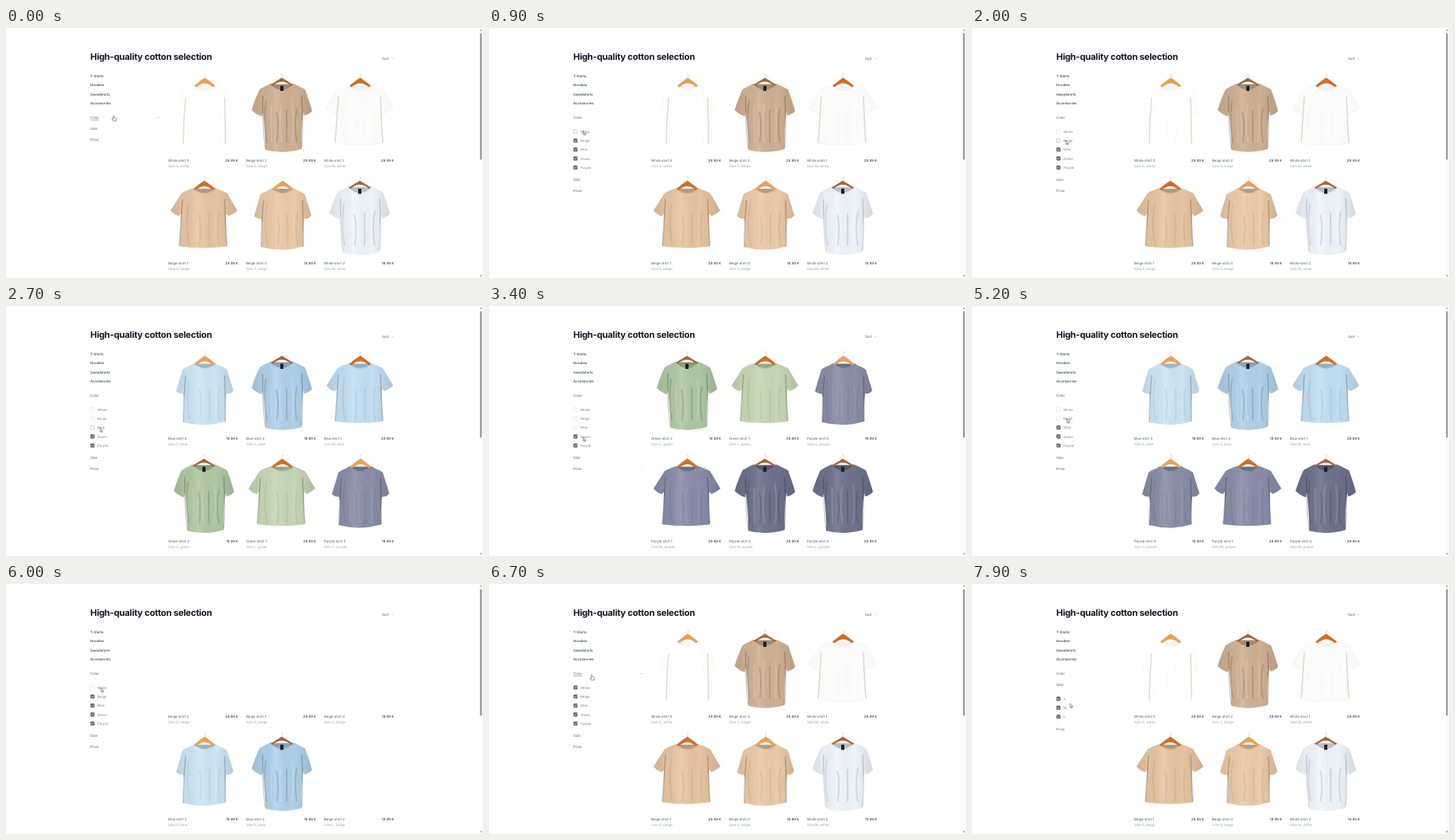
An HTML page for the animation above (8000 ms loop, 600 by 314 pixels).

```html
<!DOCTYPE html>
<html lang="en">
<head>
<meta charset="utf-8">
<title>Cotton selection</title>
<style>
  html, body { margin: 0; width: 100%; height: 100%; overflow: hidden; background: #fff; }
  svg { display: block; width: 100%; height: 100%; }
  text { font: 4.375px Inter, sans-serif; fill: #4b5563; text-rendering: geometricPrecision; }
  .title { font-size: 11.25px; font-weight: 700; letter-spacing: -.021em; fill: #111827; }
  .strong { font-weight: 500; fill: #343b48; }
  .label { fill: #7b828e; }
  .muted { fill: #9aa0aa; }
  .hover { text-decoration: underline; text-decoration-thickness: .25px; }
</style>
</head>
<body>
<svg viewBox="0 0 600 314" preserveAspectRatio="none">
  <defs>
    <linearGradient id="shade">
      <stop offset="0" stop-color="#000" stop-opacity=".1"/>
      <stop offset=".2" stop-color="#000" stop-opacity=".03"/>
      <stop offset=".4" stop-color="#fff" stop-opacity=".1"/>
      <stop offset=".7" stop-color="#000" stop-opacity=".01"/>
      <stop offset="1" stop-color="#000" stop-opacity=".12"/>
    </linearGradient>
    <filter id="soft"><feGaussianBlur stdDeviation=".7"/></filter>
  </defs>
  <text class="title" x="106" y="40">High-quality cotton selection</text>
  <text x="473" y="40">Sort</text>
  <path d="M485 38l1 .9 1-.9" fill="none" stroke="#9ca3af" stroke-width=".5"/>
  <g id="categories"></g>
  <g id="filters"></g>
  <g id="grid"></g>
  <rect x="595.3" width="4.7" height="314" fill="#fbfbfb"/>
  <path d="M596.3 3.6l1.3-2 1.3 2zM596.3 310.4l1.3 2 1.3-2z" fill="#858585"/>
  <rect id="thumb" x="596.4" y="6.5" width="2" rx="1" fill="#8b8b8b"/>
  <g id="cursor" stroke-linejoin="round">
    <path id="arrow" d="M0 0v5.1l1.2-1.1.8 1.9.8-.4-.8-1.8h1.6z" fill="#fff" stroke="#222" stroke-width=".45"/>
    <path id="hand" d="M-.6.4Q0-.3.6.4V2.6l2.2.5q.7.2.7.9L3 6.8H-.6L-2.2 4.3q0-.9.9-.5l.7.6z" fill="#fff" stroke="#222" stroke-width=".45"/>
  </g>
</svg>
<script>
const LOOP = 8000;
const $ = id => document.getElementById(id);

// Garment cuts in card coordinates; neck is [left, right, y, dip].
const CUTS = [
  { wood: '#e5a25a', neck: [32, 60, 15, 25], fold: .06, seams: 'M22 30Q19 60 19 89M71 30Q72 60 72 88',
    body: 'M32 15C27 19 22 19 18 23L10 50Q14 54 18.5 53L20 58Q20 75 19 89Q46 96 72 88Q71 72 73 53Q79 54 82 49L74 23C70 19 65 19 60 15Q46 27 32 15Z' },
  { wood: '#cd7029', neck: [31, 60, 15, 26], fold: .06, seams: 'M18 29Q16 60 14 87M71 29Q72 60 74 87',
    body: 'M31 15Q22 18 17 21L3 43Q8 49 14 50L16 47Q16 70 14 88Q44 92 74 88Q72 65 73 47L76 50Q83 47 87 43L74 21Q68 18 60 15Q45 27 31 15Z' },
  { wood: '#a8663a', neck: [30, 60, 13, 27], fold: .13, seams: 'M21 28Q20 60 24 94M70 28Q72 60 70 93',
    body: 'M30 13Q22 17 17 20Q12 30 7 46Q13 52 20 54L21 48Q25 75 24 96Q46 102 70 95Q69 70 72 48L73 53Q80 51 83 47Q78 30 74 20Q68 17 60 13Q45 29 30 13Z' }
];
const FABRIC = {
  White: ['#ffffff', '#fcfcfc', '#f0f5fb'],
  Beige: ['#ebcaa8', '#e7c5a2', '#cfb194'],
  Blue: ['#cce6f7', '#c2dff4', '#b0d1ea'],
  Green: ['#c3d6b4', '#c6d7b5', '#afc8a3'],
  Purple: ['#8b8ea8', '#898da9', '#6f728d']
};

// Each product: colour, cut, size, price.
const parse = list => list.split(', ').map(item => {
  const [color, cut, size, price] = item.split(' ');
  return { color, cut: +cut, size, price };
});
const SETS = {
  all: parse('White 0 S 29.99, Beige 2 S 29.99, White 1 M 29.99, Beige 1 S 29.99, Beige 0 S 19.99, White 2 M 19.99'),
  cool: parse('Blue 0 S 19.99, Blue 2 S 19.99, Blue 1 M 29.99, Green 2 S 19.99, Green 1 L 29.99, Purple 0 S 19.99'),
  greenPurple: parse('Green 2 S 19.99, Green 1 L 29.99, Purple 0 S 19.99, Purple 1 M 29.99, Purple 2 M 29.99, Purple 2 L 29.99'),
  purple: parse('Purple 0 S 19.99, Purple 1 M 29.99, Purple 2 M 29.99, Purple 2 L 29.99, Purple 0 L 19.99, Purple 2 S 9.99'),
  bluePurple: parse('Blue 0 S 19.99, Blue 2 S 19.99, Blue 1 M 29.99, Purple 0 S 19.99, Purple 1 M 29.99, Purple 2 M 29.99'),
  noWhite: parse('Beige 2 S 29.99, Beige 1 S 29.99, Beige 0 S 19.99, Blue 0 S 19.99, Blue 2 S 19.99, Beige 2 L 19.99')
};
const RESULTS = [[0, 'all'], [2150, 'cool'], [3200, 'greenPurple'], [3950, 'purple'],
  [4850, 'bluePurple'], [5250, 'cool'], [6000, 'noWhite'], [6500, 'all']];
const BEIGE_LOADED = 6200;

const COLORS = Object.keys(FABRIC);
const SECTIONS = [
  { name: 'Color', items: COLORS, open: [200, 6900] },
  { name: 'Size', items: ['S', 'M', 'L'], open: [7300, LOOP] },
  { name: 'Price', items: [], open: [LOOP, LOOP] }
];
const TOGGLES = { White: [900, 6100], Beige: [1600, 5300], Blue: [2700, 4300], Green: [3500, 4800] };
const PATH = [[0, 135.5, 110], [250, 135.5, 110], [800, 118.5, 129], [1000, 118.5, 129], [1400, 118, 141],
  [2000, 118, 141], [2400, 118.3, 153], [2800, 118.3, 153], [3200, 118.5, 164.5], [3600, 118.5, 164.5],
  [4000, 118.5, 153], [4350, 118.5, 153], [4650, 119, 164], [4850, 119, 164], [5150, 119.3, 141.5],
  [5330, 119.3, 141.5], [5500, 119.5, 130.5], [6200, 119.5, 130.5], [6700, 129.3, 114], [6950, 129.3, 114],
  [7250, 126, 125], [7600, 126, 125], [7900, 123.3, 150], [LOOP, 123.3, 150]];

const text = (x, y, str, cls = '', extra = '') => `<text x="${x}" y="${y}" class="${cls}" ${extra}>${str}</text>`;

function pointer(t) {
  const i = PATH.findIndex(p => p[0] > t);
  const [t0, x0, y0] = PATH[i - 1], [t1, x1, y1] = PATH[i];
  const u = (t - t0) / (t1 - t0), e = u * u * (3 - 2 * u);
  return { x: x0 + (x1 - x0) * e, y: y0 + (y1 - y0) * e };
}

function shirt(color, cut) {
  const { wood, neck: [l, r, y, dip], fold, seams, body } = CUTS[cut];
  const c = (l + r) / 2, white = color === 'White', plain = white && cut < 2;
  const fill = FABRIC[color][cut];
  const back = `M${l} ${y}Q${c} ${y + 1} ${r} ${y}Q${c} ${dip + 2} ${l} ${y}Z`;
  let dark = '', light = '';
  for (let i = 0; i < 7; i++) {
    const x = c - 20 + i * 6.5, top = 34 + i * 7 % 16;
    const line = `M${x} ${top}Q${x + (i % 3 - 1) * 4} 62 ${c - 19 + i * 6.3} 87`;
    if (i % 2) light += line; else dark += line;
  }
  const edge = plain ? (cut ? '#e9e9e9' : '#f8f6f3') : 'none';
  const ink = white ? (plain ? '#8a7350' : '#1f3a58') : '#000';
  return `<path d="M${c} 7V3.500q2-1 1-2.500-1-1-2 .3" fill="none" stroke="#bbb" stroke-width=".5"/>
    <path d="${back}" fill="${fill}"/>
    <path d="${back}" opacity="${plain ? .04 : .22}"/>
    <path d="M${l - 2} ${y + 3}Q${c - 6} 9 ${c} 5.500Q${c + 6} 9 ${r + 2} ${y + 3}H${r - 3}Q${c} ${y - 8} ${l + 3} ${y + 3}Z" fill="${wood}"/>
    <path d="${body}" fill="${fill}" stroke="${edge}" stroke-width=".4"/>
    <path d="${body}" fill="url(#shade)" opacity="${plain ? .12 : 1}"/>
    <g fill="none" stroke="${ink}">
      <g filter="url(#soft)" stroke-width="2">
        <path d="${dark}" opacity="${plain ? .015 : fold}"/>
        <path d="${light}" stroke="#fff" opacity="${fold}"/>
        <path d="${seams}" stroke-width="1.500" opacity="${plain ? .24 : .2}"/>
      </g>
      <path d="M${l} ${y + 1}Q${c} ${dip + 2} ${r} ${y + 1}" stroke-width=".6" opacity=".13"/>
    </g>
    ${cut === 2 ? `<rect x="${c - 2}" y="${y + 2.5}" width="4" height="6.500" fill="#20201f"/>` : ''}`;
}

function card({ color, cut, size, price }, i, hideBeige) {
  const x = 204 + i % 3 * 98, y = 57 + (i > 2) * 129.3;
  const image = hideBeige && color === 'Beige' ? '' : shirt(color, cut);
  return `<g transform="translate(${x} ${y})">${image}
    ${text(0, 110.7, `${color} shirt ${cut}`)}
    ${text(88, 110.7, `${price} €`, 'strong', 'text-anchor="end"')}
    ${text(0, 118.2, `Size ${size}, ${color.toLowerCase()}`, 'muted')}</g>`;
}

function checkbox(name, y, t, hovered) {
  const [off, on] = TOGGLES[name] || [LOOP, LOOP];
  const checked = t < off || t >= on;
  const pressed = [off, on].some(at => t >= at - 150 && t < at);
  const border = hovered && !pressed ? '#9c9c9c' : '#d6d6d6';
  const box = `<rect x="106.500" y="${y - 2.3}" width="4.600" height="4.600" rx=".7" stroke-width=".5"`;
  return (checked
    ? `${box} fill="#646464" stroke="#646464"/><path d="M107.500 ${y}l1 1.100 1.800-2.200" fill="none" stroke="#fff" stroke-width=".7"/>`
    : `${box} fill="#fff" stroke="${border}"/>`) + text(115, y + 1.6, name, 'label');
}

function filters(t, p) {
  let y = 112.5, html = '', overHeader = false;
  for (const { name, items, open: [from, to] } of SECTIONS) {
    const open = t >= from && t < to;
    const hovered = Math.abs(p.y - y) < 5;
    overHeader = overHeader || hovered;
    html += text(106, y + 1.6, name, hovered ? 'hover' : '');
    if (hovered) html += `<path d="M190.300 ${y}h2.600" stroke="#a9adb4" stroke-width=".5"/>`;
    else if (!open) html += `<path d="M191 ${y}h1" stroke="#c9ccd0" stroke-width=".5"/>`;
    if (open) {
      items.forEach((item, i) => {
        const row = y + 17.5 + i * 11.3;
        html += checkbox(item, row, t, Math.abs(p.y - row) < 5);
      });
      y += items.length * 11.3 + 7.5;
    }
    y += 14.1;
  }
  return { html, overHeader };
}

$('categories').innerHTML = ['T-Shirts', 'Hoodies', 'Sweatshirts', 'Accessories']
  .map((name, i) => text(106, 62.1 + i * 11.3, name, 'strong')).join('');

let shownGrid = '', shownFilters = '';
function render(t) {
  const set = RESULTS.filter(([at]) => at <= t).pop()[1];
  const hideBeige = set === 'noWhite' && t < BEIGE_LOADED;
  const key = set + hideBeige;
  if (key !== shownGrid) {
    shownGrid = key;
    $('grid').innerHTML = SETS[set].map((product, i) => card(product, i, hideBeige)).join('');
    $('thumb').setAttribute('height', set === 'purple' ? 203.5 : 159);
  }
  const p = pointer(t), { html, overHeader } = filters(t, p);
  if (html !== shownFilters) $('filters').innerHTML = shownFilters = html;
  $('cursor').setAttribute('transform', `translate(${p.x} ${p.y})`);
  $('hand').setAttribute('visibility', overHeader ? 'visible' : 'hidden');
  $('arrow').setAttribute('visibility', overHeader ? 'hidden' : 'visible');
}

const start = performance.now();
function frame() {
  render((performance.now() - start) % LOOP);
  requestAnimationFrame(frame);
}
frame();
</script>
</body>
</html>
```
